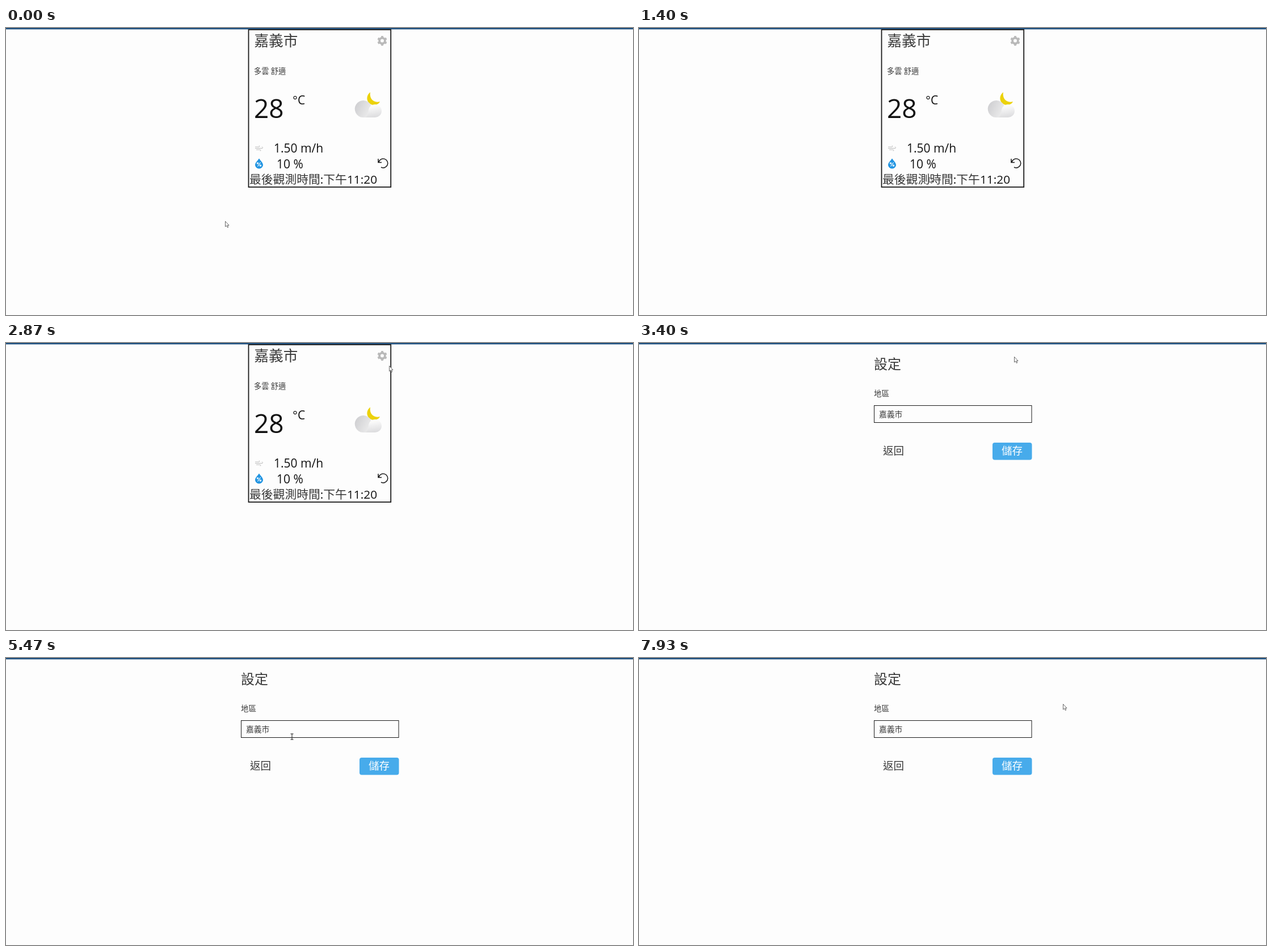
Write an HTML page that moves like this. It is 1105 px wide and 507 px high and loops after 8000 ms.

```html
<!DOCTYPE html>
<html lang="zh-Hant">
<head>
<meta charset="utf-8">
<title>天氣</title>
<style>
  html, body { margin: 0; width: 100%; height: 100%; overflow: hidden; background: #fdfdfd; }
  svg { display: block; width: 100vw; height: 100vh; }
  text { font-family: "Open Sans", "Noto Sans CJK TC", "Noto Sans CJK", sans-serif; fill: #111; white-space: pre; }
  .thin { font-weight: 300; fill: #383838; }
  .line { fill: none; stroke: #1a1a1a; }
</style>
</head>
<body>
<svg viewBox="0 0 1105 507">
  <defs>
    <linearGradient id="back" x1="0" y1="0" x2="1" y2=".4">
      <stop offset="0" stop-color="#cbcbce"/><stop offset="1" stop-color="#efefef"/>
    </linearGradient>
    <linearGradient id="front" x1=".3" y1="0" x2=".5" y2="1">
      <stop offset=".2" stop-color="#fafafa"/><stop offset="1" stop-color="#dcdcde"/>
    </linearGradient>
  </defs>
  <rect width="1105" height="3" fill="#a9bccd"/>
  <rect width="1105" height="2" fill="#1d4f7f"/>

  <g id="weather">
    <rect class="line" x="427.5" y="3" width="250.7" height="278" stroke-width="1.8"/>
    <text class="thin" x="437.5" y="32" font-size="25.6">嘉義市</text>
    <text class="thin" x="437" y="80.5" font-size="13.2">多雲 舒適</text>
    <text x="437" y="159" font-size="46">28</text>
    <text x="505" y="135" font-size="21">°C</text>
    <text x="472" y="220" font-size="21">1.50 m/h</text>
    <text x="477" y="248" font-size="21">10 %</text>
    <text x="429" y="275" font-size="20.8"><tspan class="thin">最後觀測時間</tspan>:<tspan class="thin">下午</tspan>11:20</text>

    <g fill="none" stroke="#b9b9b9" transform="translate(663 22.6)">
      <circle r="4.9" stroke-width="3.8"/>
      <circle r="7" stroke-width="3.4" pathLength="12" stroke-dasharray="1" stroke-dashoffset="-.5"/>
    </g>

    <path d="M642 113.5C633 120 635 134 647 136C653 136 657 134 659 130C648 133 640 125 642 113.5Z" fill="#ecd20c"/>
    <path d="M629 158A15 15 0 1 1 643 136L650 158Z" fill="url(#back)"/>
    <path d="M633 158C637 157 637 152 639 147A11.500 11.500 0 1 1 650 158Z" fill="url(#front)"/>

    <path d="M439 210h7q2-1 0-2.500M439 212.500h13q1-2-1-3M441 215h7q2 1 0 2.500" fill="none" stroke="#bcbcbc"/>
    <path d="M446 230.500C449 235 453 238 453 242A7 6.500 0 0 1 439 242C439 238 443 235 446 230.500Z" fill="#2295e2"/>
    <g fill="none" stroke="#fff" stroke-width="1.2">
      <path d="M448.500 237.500L443.500 244.500"/>
      <circle cx="443.600" cy="239" r="1.200"/><circle cx="448.400" cy="243" r="1.200"/>
    </g>
    <path class="line" d="M657 237A8 8 0 1 1 661 246M656 231V237.500H662" stroke-width="1.5"/>
  </g>

  <g id="settings">
    <text class="thin" x="414" y="46" font-size="24">設定</text>
    <text class="thin" x="414" y="94" font-size="13.5">地區</text>
    <rect class="line" x="414.5" y="110.5" width="277.5" height="30"/>
    <text class="thin" x="423" y="131" font-size="13.8">嘉義市</text>
    <rect id="caret" x="465" y="118" width="1" height="15" fill="#222"/>
    <text class="thin" x="430" y="196.5" font-size="18.5">返回</text>
    <rect x="623" y="176" width="69.5" height="30.5" rx="4" fill="#47abeb"/>
    <text class="thin" x="639" y="196.5" font-size="18.5" style="fill:#fff">儲存</text>
  </g>

  <g id="pointer">
    <path id="arrow" d="M.5 .5V10L2.800 8L4.300 11.500L5.800 10.800L4.400 7.500H7Z" fill="#fff" stroke="#444" stroke-width=".8"/>
    <path id="beam" class="line" d="M-2.500 -5H2.500M0 -5V5M-2.500 5H2.500"/>
  </g>
</svg>
<script>
const LOOP = 8000, OPEN = 3200, FOCUS = 4940, BLINK = 530;
const $ = id => document.getElementById(id);

// pointer stops: time, x, y
const stops = [
  [900, 386, 341], [2000, 676, 161], [2870, 675, 40], [3200, 661, 24],
  [3500, 661, 24], [3930, 430, 185], [4530, 675, 165], [4800, 420, 195],
  [5000, 504, 139], [7800, 504, 139], [7930, 747, 81]
];

function pointerAt(t) {
  const next = stops.findIndex(s => s[0] > t);
  if (next === 0) return stops[0].slice(1);
  if (next < 0) return stops.at(-1).slice(1);
  const [t0, x0, y0] = stops[next - 1], [t1, x1, y1] = stops[next];
  const k = (t - t0) / (t1 - t0), ease = k * k * (3 - 2 * k);
  return [x0 + (x1 - x0) * ease, y0 + (y1 - y0) * ease];
}

const show = (id, on) => $(id).setAttribute("visibility", on ? "visible" : "hidden");

function draw(now) {
  const t = now % LOOP, open = t >= OPEN;
  const [x, y] = pointerAt(t).map(Math.round);
  const inField = open && x > 414 && x < 692 && y > 110 && y < 141;
  show("weather", !open);
  show("settings", open);
  show("caret", t >= FOCUS && Math.floor((t - FOCUS) / BLINK) % 2 === 0);
  show("arrow", !inField);
  show("beam", inField);
  $("pointer").setAttribute("transform", `translate(${x} ${y})`);
}

let start;
function tick(now) {
  start ??= now;
  draw(now - start);
  requestAnimationFrame(tick);
}
draw(0);
requestAnimationFrame(tick);
</script>
</body>
</html>
```
